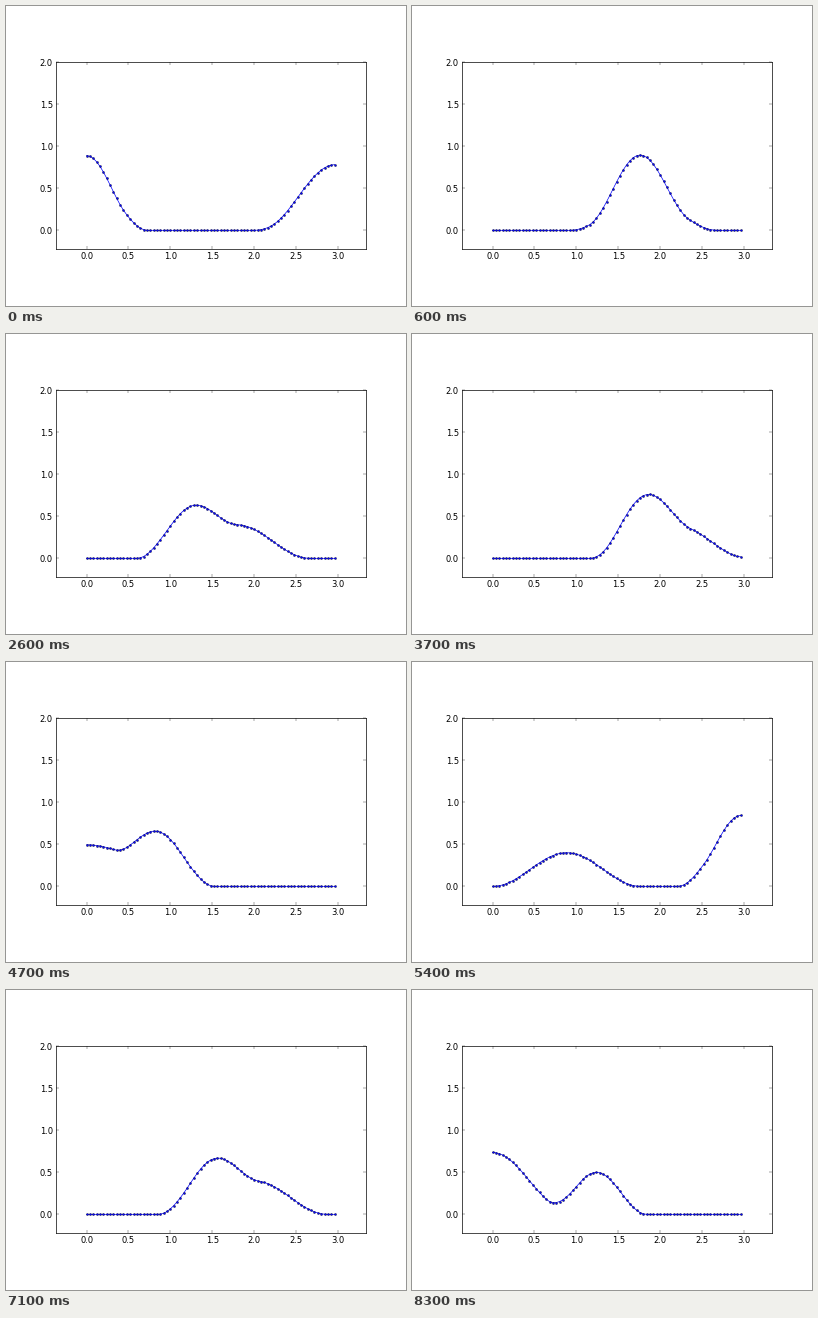
A matplotlib script for the animation above (8400 ms loop, 400x300 px).

```python
import numpy as np
import matplotlib.pyplot as plt
from matplotlib.animation import FuncAnimation

FRAMES, INTERVAL = 84, 100
LENGTH = 2.965         # distance between the reflecting walls
STEP = 0.17953         # travel of the slow pulse per frame

plt.rcParams.update({
    "font.family": "DejaVu Sans",
    "font.size": 12,
    "axes.linewidth": 1.0,
    "xtick.direction": "in", "ytick.direction": "in",
    "xtick.top": True, "ytick.right": True,
    "xtick.major.size": 4, "ytick.major.size": 4,
    "xtick.major.width": 0.5, "ytick.major.width": 0.5,
    "xtick.major.pad": 4, "ytick.major.pad": 4,
})

x = np.arange(75) * 0.04


def hump(d, height, half):
    """Raised cosine of the given height and half width."""
    return np.where(np.abs(d) < half,
                    height * np.cos(np.pi * d / (2 * half)) ** 2, 0.0)


def pulse(phase, height, half):
    """Travelling hump plus its mirror images in both walls."""
    period = 2 * LENGTH
    wrap = lambda d: (d + LENGTH) % period - LENGTH
    return (hump(wrap(x - phase), height, half)
            + hump(wrap(x + phase), height, half))


def wave(i):
    fast = pulse(0.129 + 1.5 * STEP * i, 0.5, 0.6)
    slow = pulse(-2.881 + STEP * i, 0.4, 0.88)
    return fast + slow


fig = plt.figure(figsize=(8, 6), dpi=50, facecolor="white")
# box in pixels from the lower left corner
ax = fig.add_axes([49.6 / 400, 57.2 / 300, 310 / 400, 186.4 / 300])
ax.set_xlim(-0.37, 3.33)
ax.set_ylim(-0.22, 2.0)
ax.set_xticks(np.arange(0, 3.1, 0.5))
ax.set_yticks(np.arange(0, 2.1, 0.5))

line, = ax.plot(x, wave(0), color="blue", lw=1.0, marker=".", ms=6,
                mfc="blue", mec="black", mew=0.5)


def update(i):
    line.set_ydata(wave(i))
    return line,


anim = FuncAnimation(fig, update, frames=FRAMES, interval=INTERVAL,
                     repeat=True, repeat_delay=0)
plt.show()
```
